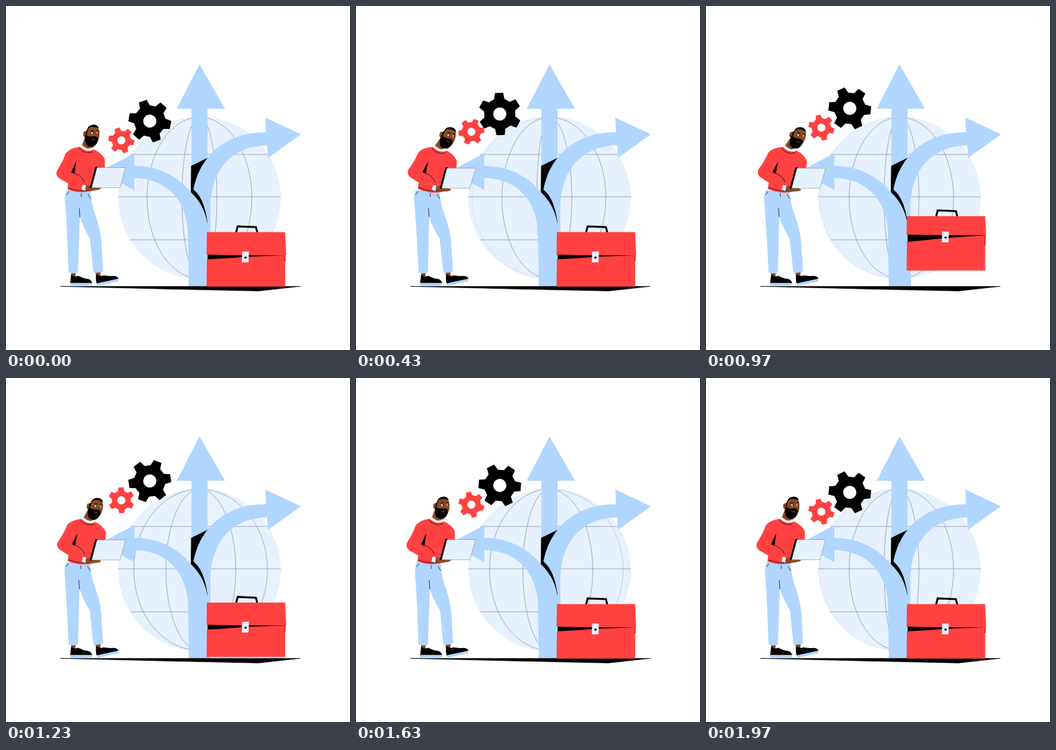
An HTML page for the animation above (2000 ms loop, 512 px wide and 512 px high).

```html
<!DOCTYPE html>
<html lang="en">
<head>
<meta charset="utf-8">
<title>Business directions</title>
<style>
html, body { margin: 0; width: 100%; height: 100%; overflow: hidden; background: #fff; }
svg { display: block; width: 100vw; height: 100vh; }
.sky { fill: #b0d6ff; }
.pale { fill: #e7f1fe; }
.red { fill: #ff4141; }
.skin { fill: #8a4a23; }
.grid { fill: none; stroke: #9aa3b0; stroke-width: .9; }
.ink { fill: none; stroke: #000; }
</style>
</head>
<body>
<svg viewBox="0 0 512 512">
  <!-- globe -->
  <circle class="pale" cx="288" cy="285.5" r="121"/>
  <path class="grid" d="M185 221H391M167 284H409M185 348H391"/>
  <g id="meridians" class="grid"></g>

  <!-- arrows -->
  <path class="sky" d="M288 87L326 153H300V240L276 285V153H254Z"/>
  <path d="M275.500 238L301 225.500L296 250L282 274Q297 292 300.500 327Q293 297 275 277Z"/>
  <path class="sky" d="M386 166L439 191L390 226L388.500 207.500C340 208 305 240 304 300L305 417H298L300.500 327Q299 291 279 273C287 228 323 187 387 188Z"/>
  <path class="sky" d="M140 246L191 219V238C230 238 258 256 275 277C290 291 297 306 300.500 327L304 330L305 417H272L271 342C270 285 236 257 191 256V274Z"/>

  <path stroke="#000" stroke-width=".6" d="M81 417.300H438L376 424.200L240 421.300Z"/>

  <!-- briefcase -->
  <g id="bag">
    <path d="M300 362H416V380H300Z"/>
    <path id="case" class="red"/>
    <path class="ink" stroke-width="2.800" d="M342.500 337L344.800 328L372 329.200L374 337"/>
    <path id="lid" class="red" d="M299 336.500H415.500L417 371L362 371Q330 371 298.500 370Z"/>
    <g id="clasp">
      <path class="pale" d="M351.500 365.500H361.500L361 381.500H351Z"/>
      <circle cx="356.500" cy="374.500" r="1.700"/>
    </g>
  </g>

  <g id="black"></g>
  <g id="small" class="red"></g>

  <!-- shoes -->
  <path class="skin" d="M97 395H104L103 406H97ZM133 394H141L140 404H134Z"/>
  <path d="M97 399.500Q102 404 107 401.500L117 405.500Q127 405.500 128.500 412.500H95.500Z"/>
  <path class="sky" d="M95.500 412.500H128.500L127 416.500H95.500Z"/>
  <path d="M135 399Q140 403 145 401L155 402Q166 400.500 167.500 406L135 413Q132.500 406 135 399Z"/>
  <path class="sky" d="M135 413L167.500 406L166.500 410L135.500 416.500Z"/>

  <g id="legs">
    <path class="sky" d="M90 274L126 276Q127 295 133 311Q141 334 142 350L144.500 395Q137 398 130 396.500L125 346Q115 330 110 314L107 397Q100 399 93 396.500Q91 330 87.500 286Z"/>
    <path class="ink" stroke="#7189a8" stroke-width=".7" d="M110 314L109 301M90 281L94 276M112 279V284M122 280L126 287"/>
  </g>

  <g id="torso">
    <g id="head">
      <path class="skin" d="M118 194L131 199L130 214L112 210Z"/>
      <path class="skin" d="M120 184Q124 177 136 180Q140 184 139 194Q137 207 127 208Q119 205 119 195Q114 196 115 189Q116 185 120 187Z"/>
      <path d="M121 185Q121 177 131 176.500Q137 177 138 182Q132 179 126 180.500Q121 181 121 189L119.500 193Q117 185 121 185Z"/>
      <path d="M118.500 191Q122 195 129 194Q134 193 136.500 196Q137.500 204 131.500 208.500Q125 211.500 119.500 207Q116.500 201 118.500 191Z"/>
      <path class="skin" d="M127 198L133 198.500L130 200Z"/>
      <path fill="#fff" d="M127 188h3.200v2.200h-3.200zM135 187.500h2.300v2.200h-2.300z"/>
      <path d="M129 188h1.400v2h-1.400zM136.200 187.500h1.300v2h-1.300z"/>
      <path class="ink" stroke-width="1" d="M126 186L130.500 185.500M134.500 185.500L138 185"/>
    </g>
    <path class="pale" d="M113 207L121 213L130 210L131 217L120 219L111 213Z"/>
    <path class="red" d="M110 209.500Q120 219 131 213.500Q143 219 147 228V242L133 274Q112 281 91.500 273L92.500 264L80 257Q73 252 76 245Q85 231 89 219Q96 211 110 209.500Z"/>
    <path class="ink" stroke="#a51d20" stroke-width=".7" d="M109 212Q118 221 129 217M93 271Q110 277 128 274M98 248Q112 251 117 262"/>
    <path d="M104.500 231L97 247.500L102 249.500Z"/>
    <path class="pale" d="M114 266L120 267L118 275L112.500 273Z"/>
    <path class="skin" d="M119 267L128 268Q142 269 141 272Q134 276 118 274Z"/>
  </g>

  <g id="laptop">
    <path d="M133 239.500H137L129 271H124.500Z"/>
    <path class="pale" stroke="#777" stroke-width=".5" d="M135.500 240.500H178L169.500 270.500H127.500Z"/>
  </g>
</svg>
<script>
const LOOP = 2000;
const get = id => document.getElementById(id);
const set = (el, name, value) => el.setAttribute(name, value);
const move = (id, value) => set(get(id), 'transform', value);
const mix = (a, b, p) => a + (b - a) * p;
const ramp = (t, from, to) => Math.min(1, Math.max(0, (t - from) / (to - from)));
const smooth = p => p * p * (3 - 2 * p);

function addNode(parent) {
  return parent.appendChild(document.createElementNS('http://www.w3.org/2000/svg', 'path'));
}

// Six flared teeth around a ring, with the hub cut out.
function drawGear(id, size) {
  const point = (deg, r) => {
    const a = deg * Math.PI / 180;
    return (r * size * Math.cos(a)).toFixed(2) + ' ' + (r * size * Math.sin(a)).toFixed(2);
  };
  let d = '';
  for (let k = 0; k < 6; k++) {
    const c = k * 60;
    d += (k ? 'L' : 'M') + point(c - 19, 23.5) + 'L' + point(c - 11, 32) +
      'L' + point(c + 11, 32) + 'L' + point(c + 19, 23.5);
  }
  const r = 9.8 * size;
  d += `ZM${r} 0A${r} ${r} 0 1 0 ${-r} 0A${r} ${r} 0 1 0 ${r} 0Z`;
  const node = addNode(get(id));
  set(node, 'd', d);
  set(node, 'fill-rule', 'evenodd');
}

drawGear('black', 1);
drawGear('small', 0.61);

const stops = [167, 210, 262, 314, 366, 409];
const lines = stops.slice(1).map(() => addNode(get('meridians')));

// Meridians drift left from stop to stop and fade at the rim.
function drawGlobe(t) {
  const p = 1 - (t % 500) / 500;
  lines.forEach((line, i) => {
    const x = mix(stops[i], stops[i + 1], p);
    const dx = x - 288;
    set(line, 'd', `M288 165.500A${Math.abs(dx)} 120 0 0 ${dx < 0 ? 0 : 1} 288 405.500`);
    set(line, 'opacity', ramp(121 - Math.abs(dx), 0, 22));
  });
}

function drawGears(t) {
  const fall = ((t - 1000) / 1000) ** 2;
  const lag = t < 1000 ? 2.4 * Math.sin(Math.PI * t / 1000) ** 2 : 0;
  const turn = t * 360 / LOOP;
  move('black', `translate(214 ${152.3 + 19 * fall + lag}) rotate(${10.5 + turn})`);
  move('small', `translate(171.700 ${181 + 19 * fall}) rotate(${10 - turn})`);
}

function drawBag(t) {
  const up = 1 - (1 - ramp(t, 540, 740)) ** 2;
  const down = ramp(t, 740, 1250) ** 2;
  const open = 6 * Math.sin(Math.PI * ramp(t, 690, 1250));
  const left = 377 - open * 0.3, mid = 373 - open * 0.7, right = 371 - open;
  move('bag', `translate(0 ${-30 * (up - down)})`);
  set(get('case'), 'd', `M299 ${left}Q340 ${mid + 2} 362 ${mid}L415.5 ${right}V417.5H298.5Z`);
  move('lid', `translate(0 336.500) scale(1 ${1 - open / 34}) translate(0 -336.500)`);
  move('clasp', `translate(0 ${-open})`);
}

function drawMan(t) {
  const lean = smooth(ramp(t, 0, 450)) - smooth(ramp(t, 950, 1550));
  const k = 0.0125 * lean;
  move('legs', `matrix(1 0 ${k} 1 ${-k * 397} 0)`);
  move('torso', `rotate(${3.7 * lean} 107 278)`);
  move('head', `rotate(${10 * lean} 122 212)`);
  move('laptop', `translate(0 ${0.8 * lean})`);
}

function frame() {
  const t = performance.now() % LOOP;
  drawGlobe(t);
  drawGears(t);
  drawBag(t);
  drawMan(t);
  requestAnimationFrame(frame);
}
frame();
</script>
</body>
</html>
```
